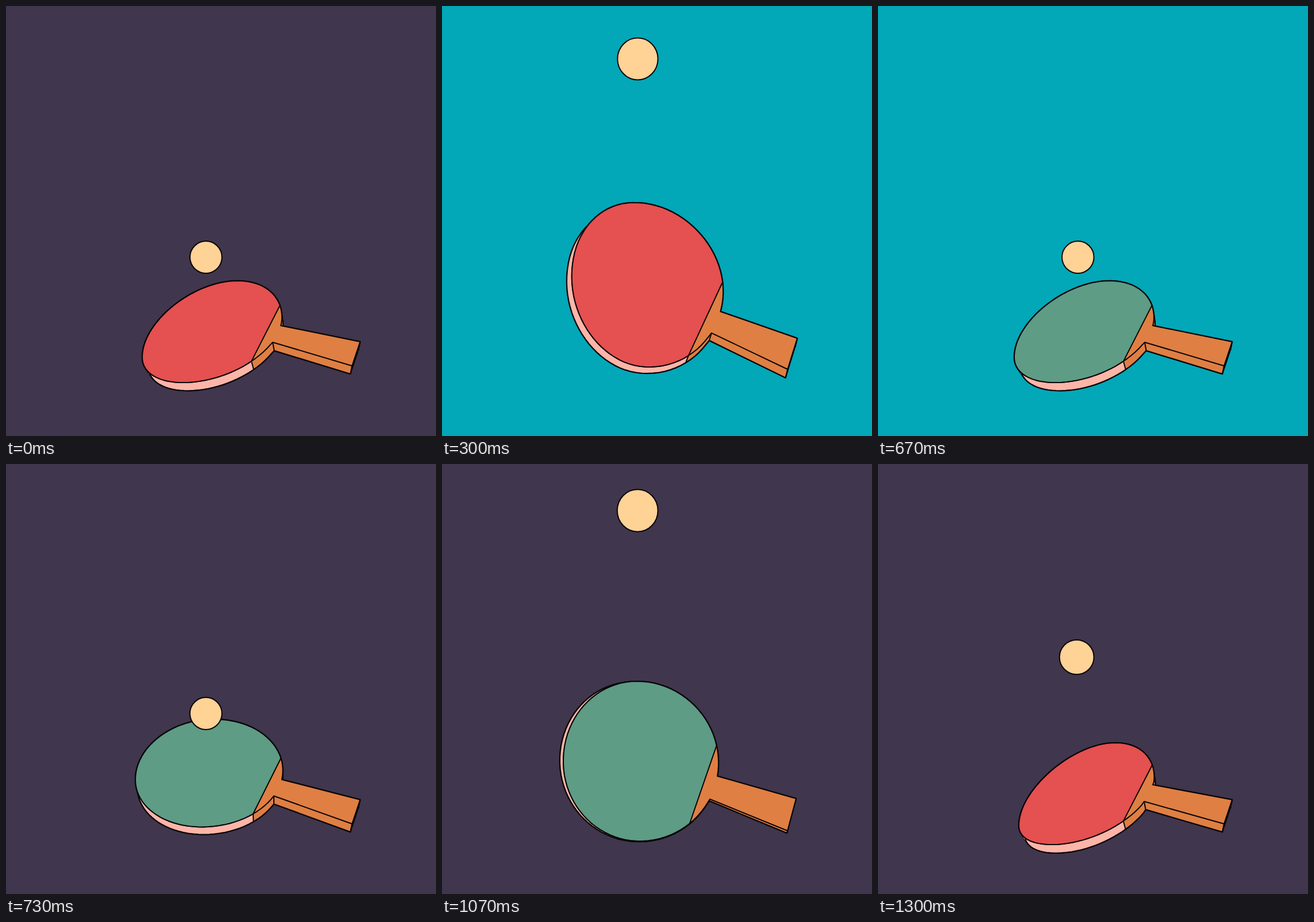
These frames come from a looping animation (748x748 px, 1.33 s). An HTML page:

```html
<!DOCTYPE html>
<html lang="en">
<head>
<meta charset="utf-8">
<title>Paddle and ball</title>
<style>
  html, body { margin: 0; width: 100%; height: 100%; overflow: hidden; }
  svg { display: block; width: 100vw; height: 100vh; }
</style>
</head>
<body>
<svg viewBox="0 0 748 748">
  <rect id="bg" width="748" height="748"/>
  <g stroke="#080508" stroke-width="2" stroke-linejoin="round" stroke-linecap="round" fill="none">
    <path id="hull" stroke-width="2.6"/>
    <path id="woodSide" fill="#df7f43" stroke="#df7f43" stroke-width=".6"/>
    <path id="rubberSide" fill="#fdb5a8" stroke="#fdb5a8" stroke-width=".6"/>
    <path id="cap" fill="#080508" stroke-width="1.4"/>
    <path id="edges"/>
    <path id="wood" fill="#df7f43"/>
    <path id="rubber"/>
    <ellipse id="ball" fill="#ffd296"/>
  </g>
</svg>
<script>
const el = id => document.getElementById(id);
const part = {};
for (const id of ["bg", "hull", "woodSide", "rubberSide", "cap", "edges", "wood", "rubber", "ball"]) part[id] = el(id);

const PURPLE = "#40364d", TEAL = "#02a7b8", RED = "#e55050", GREEN = "#5e9c85";
const LOOP = 1330, STEP = 100 / 3, HALF = 20;
const NECK = 6, RIM = 72;                 // samples along neck and rubber edge
const CUT1 = 1 + NECK, CUT2 = CUT1 + RIM; // where the rubber starts and ends
const RAD = Math.PI / 180;

const mix = (a, b, u) => a + (b - a) * u;
const mix2 = (p, q, u) => [mix(p[0], q[0], u), mix(p[1], q[1], u)];
const add = (p, q) => [p[0] + q[0], p[1] + q[1]];
const neg = p => [-p[0], -p[1]];

// Egg-shaped blade through its left, top, right and bottom extremes.
function blade(L, T, R, B) {
  const cx = (L[0] + R[0]) / 2, cy = (T[1] + B[1]) / 2;
  const w = (R[0] - L[0]) / 2, h = (B[1] - T[1]) / 2;
  const lean = [(L[1] - cy) / h, (T[0] - cx) / w, (cy - R[1]) / h, (cx - B[0]) / w];
  const tilt = (...s) => Math.asin(s.reduce((a, b) => a + b) / s.length);
  const skew = tilt(...lean) / RAD;
  const at = [-skew / 2, 90 + skew / 2, 180 - skew / 2, 270 + skew / 2, 360 - skew / 2];
  const ends = [L, T, R, B, L];
  const corners = [[L[0], T[1]], [R[0], T[1]], [R[0], B[1]], [L[0], B[1]]];
  // Each quarter gets handles like those of an ellipse leaning as its two ends do.
  const handles = lean.map((s, i) => {
    const a = tilt(s, lean[(i + 1) % 4]);
    const c = Math.cos((Math.PI / 2 + (i % 2 ? -a : a)) / 2);
    return 4 * c / (3 * (1 + c));
  });
  return deg => {
    let a = ((deg - at[0]) % 360 + 360) % 360 + at[0], i = 0;
    while (i < 3 && a > at[i + 1]) i++;
    const t = (a - at[i]) / (at[i + 1] - at[i]), s = 1 - t;
    const p = ends[i], q = ends[i + 1];
    const p1 = mix2(p, corners[i], handles[i]), q1 = mix2(q, corners[i], handles[i]);
    return [0, 1].map(j => s * s * s * p[j] + 3 * s * s * t * p1[j] + 3 * s * t * t * q1[j] + t * t * t * q[j]);
  };
}

function nearest(curve, p) {
  let best = 1e9, deg = 180;
  for (let a = 90; a <= 300; a += .25) {
    const c = curve(a), d = Math.hypot(c[0] - p[0], c[1] - p[1]);
    if (d < best) { best = d; deg = a; }
  }
  return deg;
}

// A pose is one face outline plus the offset of each point to the other face.
function pose(o) {
  const [L, T, R, B] = o.egg, curve = blade(L, T, R, B);
  const [p, q] = o.cut.map(v => nearest(curve, v));
  const [n1, n2] = o.neck.map(v => nearest(curve, v));
  const [e1, e2] = o.end || [[616, 584], [602, 626]];
  const g = o.endOff || [-3, 14];
  const arc = [];
  const sweep = (a, b, n) => { for (let i = 0; i < n; i++) arc.push(curve(mix(a, b, i / n))); };
  sweep(n1, p, NECK);
  sweep(p, q - 360, RIM);
  sweep(q - 360, n2 - 360, NECK);
  arc.push(curve(n2));
  arc[0] = o.neck[0];
  arc[arc.length - 1] = o.neck[1];
  const off = arc.map(v => mix2(o.off[0], o.off[1], (v[0] - L[0]) / (R[0] - L[0])));
  return { pts: [e1, ...arc, e2], off: [g, ...off, g] };
}

const flip = s => ({
  pts: s.pts.map((p, i) => add(p, s.off[i])).reverse(),
  off: s.off.map(neg).reverse()
});

const low = pose({
  egg: [[245, 629], [413, 485], [480.5, 545], [302, 662]],
  cut: [[476, 524], [428, 623]], neck: [[478, 558], [463, 587]], off: [[10, 15], [2, 14]]
});
const start = pose({
  egg: [[237, 611], [403, 478], [480, 542], [308, 655]],
  cut: [[476, 521], [428, 619]], neck: [[478, 556], [464, 585]], off: [[10, 14], [2, 14.5]]
});
const lift = pose({
  egg: [[222, 490], [324, 401], [484, 525], [369, 614]],
  cut: [[480, 503], [433, 600]], neck: [[482, 542], [468, 570]], off: [[-5, 11], [-3, 13]]
});
const high = pose({
  egg: [[231, 468], [319, 380], [485, 520], [379, 608]],
  cut: [[482, 499], [434, 597]], neck: [[483, 539], [470, 567]], off: [[-8, 10], [-4, 13]]
});
const facing = pose({
  egg: [[211, 517], [339, 378], [481, 520], [344, 656]],
  cut: [[477, 490], [431, 625]], neck: [[479, 543], [466, 583]], off: [[-6, -1], [-1, 3]],
  end: [[616, 582], [601, 638]], endOff: [-1, 4]
});
const tipped = pose({
  egg: [[196, 593], [335, 481], [468.5, 587], [322, 668]],
  cut: [[451, 535], [445, 632]], neck: [[468, 574], [465, 602]], off: [[-3, -16], [2, -15.5]],
  end: [[609, 600], [602, 638]], endOff: [5, -16]
});

const swing = [
  [-6, flip(tipped)], [-1, low], [0, start], [4, lift], [6, high], [12, facing],
  [14, tipped], [19, flip(low)], [20, flip(start)], [24, flip(lift)]
];
const bounce = [
  [1, 540], [2, 434], [4, 260], [6, 160], [9, 92], [11, 78],
  [12, 81], [14, 104], [19, 336], [20, 437], [21, 540]
];

// Weights of four neighbouring keys for a smooth curve with uneven spacing.
function weights(keys, n) {
  let i = 0;
  while (i < keys.length - 2 && n >= keys[i + 1][0]) i++;
  const time = j => keys[j][0], h = time(i + 1) - time(i), u = (n - time(i)) / h;
  const w = new Map();
  const put = (j, v) => w.set(j, (w.get(j) || 0) + v);
  const slope = (a, b, v) => { const d = time(b) - time(a); put(b, v / d); put(a, -v / d); };
  const tangent = (j, v) => {
    if (j === 0) return slope(0, 1, v);
    if (j === keys.length - 1) return slope(j - 1, j, v);
    const a = time(j) - time(j - 1), b = time(j + 1) - time(j);
    slope(j - 1, j, v * b / (a + b));
    slope(j, j + 1, v * a / (a + b));
  };
  const u2 = u * u, u3 = u2 * u;
  put(i, 2 * u3 - 3 * u2 + 1);
  put(i + 1, 3 * u2 - 2 * u3);
  tangent(i, (u3 - 2 * u2 + u) * h);
  tangent(i + 1, (u3 - u2) * h);
  return [...w];
}

function blend(n) {
  const w = weights(swing, n);
  const sum = name => swing[0][1][name].map((_, i) => [0, 1].map(
    c => w.reduce((t, [j, v]) => t + v * swing[j][1][name][i][c], 0)));
  return { pts: sum("pts"), off: sum("off") };
}

const area = pts => pts.reduce((t, p, i) => {
  const q = pts[(i + 1) % pts.length];
  return t + p[0] * q[1] - p[1] * q[0];
}, 0);
const line = pts => "M" + pts.map(p => p[0].toFixed(2) + " " + p[1].toFixed(2)).join("L");
const loop = pts => line(pts) + "Z";
const setD = (id, d) => part[id].setAttribute("d", d);

function drawPaddle(n, half) {
  const { pts, off } = blend(n);
  const other = pts.map((p, i) => add(p, off[i]));
  const facingUs = area(pts.slice(CUT1, CUT2 + 1)) < 0;
  const front = facingUs ? pts : other, back = facingUs ? other : pts;

  let wood = "", rubber = "";
  for (let i = 0; i < front.length - 1; i++) {
    const quad = [front[i], front[i + 1], back[i + 1], back[i]];
    if (area(quad) < 0) quad.reverse();
    if (i >= CUT1 && i < CUT2) rubber += loop(quad);
    else wood += loop(quad);
  }
  const last = front.length - 1;
  const ribs = [0, 1, CUT1, CUT2, last - 1, last].map(i => line([front[i], back[i]])).join("");
  setD("hull", wood + rubber);
  setD("woodSide", wood);
  setD("rubberSide", rubber);
  setD("cap", loop([front[0], front[last], back[last], back[0]]));
  setD("edges", loop(back) + ribs);
  setD("wood", loop(front));
  setD("rubber", loop(front.slice(CUT1, CUT2 + 1)));
  part.rubber.setAttribute("fill", facingUs === (half === 0) ? RED : GREEN);
}

function drawBall(n) {
  const m = n < 1 ? n + HALF : n;
  const y = weights(bounce, m).reduce((t, [j, v]) => t + v * bounce[j][1], 0);
  const rise = (437 - y) / 356, rx = 27.8 + 7.6 * rise;
  const set = { cx: 375.6 - rx, cy: y, rx, ry: rx + .1 + 1.3 * rise ** 3 };
  for (const k in set) part.ball.setAttribute(k, set[k].toFixed(2));
}

function draw(ms) {
  const step = Math.floor((ms % LOOP + 3.4) / STEP);
  const half = step < HALF ? 0 : 1, n = step - half * HALF;
  // The backdrop switches at each hit.
  part.bg.setAttribute("fill", step >= 1 && step < HALF + 1 ? TEAL : PURPLE);
  drawPaddle(n, half);
  drawBall(n);
}

const t0 = performance.now();
function tick() {
  draw(performance.now() - t0);
  requestAnimationFrame(tick);
}
tick();
</script>
</body>
</html>
```
